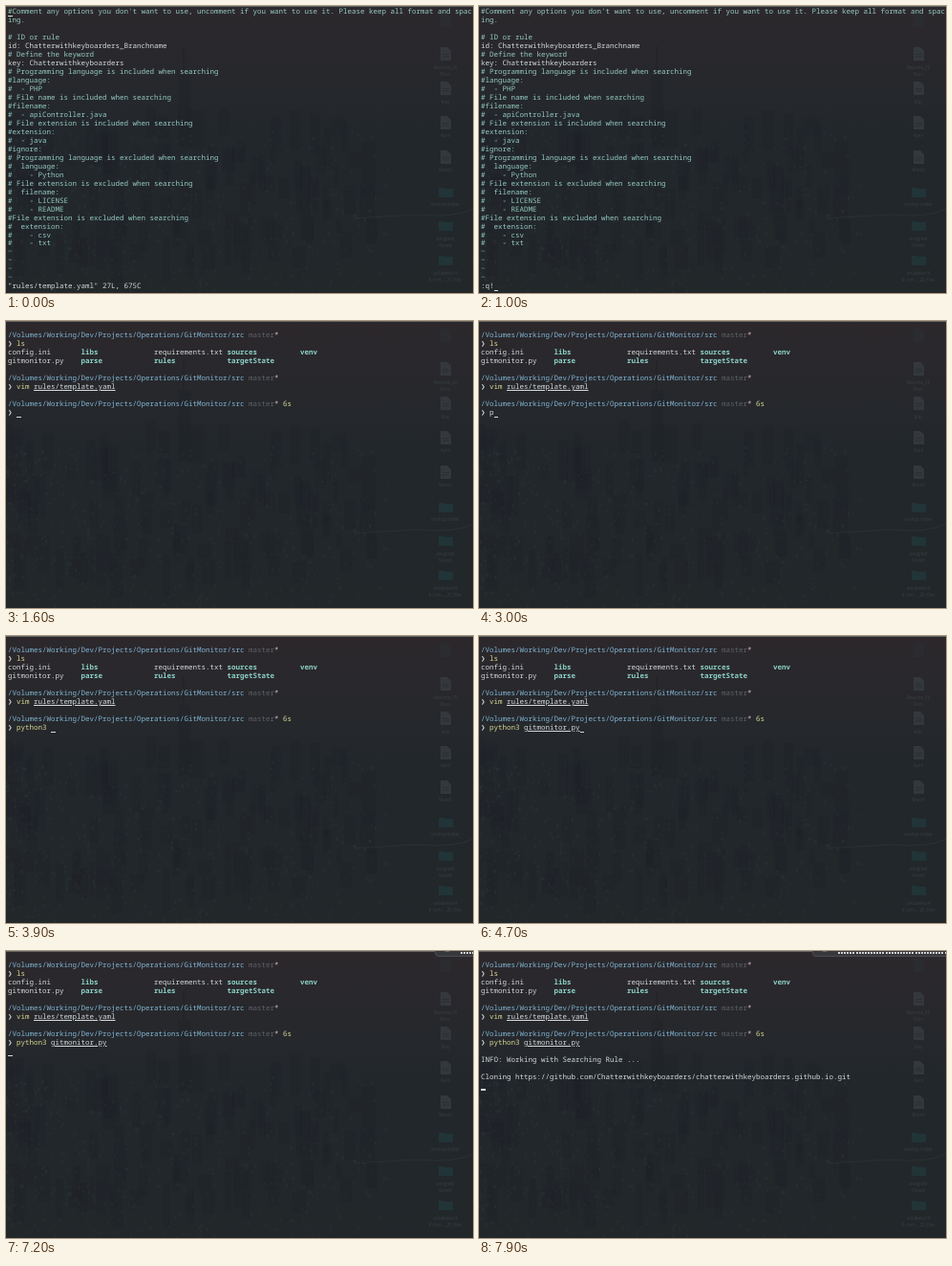
An HTML page with a canvas for the animation above (8 s loop, 489 by 300 pixels).

```html
<!DOCTYPE html>
<html lang="en">
<head>
<meta charset="utf-8">
<title>Terminal session</title>
<style>
  html, body { margin: 0; width: 100%; height: 100%; overflow: hidden; background: #22272b; }
  #stage { position: relative; width: 489px; height: 300px; overflow: hidden; }
  canvas, #text { position: absolute; left: 0; top: 0; }
  #text { font: 500 7.5px/8.97px "Noto Sans Mono", "DejaVu Sans Mono", monospace;
    color: #d3d8d8; text-rendering: geometricPrecision; font-variant-ligatures: none; }
  .row { position: absolute; left: 2px; height: 8.97px; white-space: pre; }
  .path { color: #80b4d3; }
  .branch { color: #5d6166; }
  .star { color: #e6c3d2; }
  .yellow { color: #d9d792; }
  .dir { color: #8bd0c7; font-weight: 600; }
  .note { color: #94c9c0; }
  .tilde { color: #7da7b4; }
  .file { text-decoration: underline; text-decoration-thickness: .8px; text-underline-offset: 1px; }
  .sign { display: inline-block; width: 4.5px; }
  #cursor { position: absolute; width: 4.5px; height: 1.2px; background: #d8dcdc; }
  .label { position: absolute; left: 430px; width: 60px; text-align: center; white-space: pre;
    font: 4.6px/7px "Open Sans", sans-serif; color: #3a3f43; }
  #toast { position: absolute; top: -30px; width: 170px; height: 36px; box-sizing: border-box;
    background: #37383c; border: 1px solid #4b4c50; border-radius: 4px; overflow: hidden; }
  #toast i { position: absolute; left: 8px; top: 22px; width: 8px; height: 8px; border-radius: 50%; background: #696b6f; }
  #toast b { position: absolute; left: 26px; top: 30px; width: 140px; height: 2px;
    background: repeating-linear-gradient(90deg, #d0d1d3 0 2px, transparent 2px 3.1px); }
</style>
</head>
<body>
<div id="stage">
  <canvas id="back" width="489" height="300"></canvas>
  <div id="labels"></div>
  <div id="text"></div>
  <div id="cursor"></div>
  <div id="toast"><i></i><b></b></div>
</div>
<script>
const LOOP = 8000, STEP = 100, ROW = 8.97, COL = 4.5;
const el = id => document.getElementById(id);
const span = (cls, s) => `<span class="${cls}">${s}</span>`;

const vimLines = `#Comment any options you don't want to use, uncomment if you want to use it. Please keep all format and spac
ing.

# ID or rule
id: Chatterwithkeyboarders_Branchname
# Define the keyword
key: Chatterwithkeyboarders
# Programming language is included when searching
#language:
#  - PHP
# File name is included when searching
#filename:
#  - apiController.java
# File extension is included when searching
#extension:
#  - java
#ignore:
# Programming language is excluded when searching
#  language:
#    - Python
# File extension is excluded when searching
#  filename:
#    - LICENSE
#    - README
#File extension is excluded when searching
#  extension:
#    - csv
#    - txt
~
~
~
~`.split("\n").map((s, i) =>
  s[0] === "#" || i === 1 ? span("note", s) : s === "~" ? span("tilde", s) : s);

const prompt = span("path", "/Volumes/Working/Dev/Projects/Operations/GitMonitor/src") +
  " " + span("branch", "master") + span("star", "*");
const sign = span("sign", "❯") + " ";
const list = (file, dirs, mid) =>
  file.padEnd(17) + span("dir", dirs[0].padEnd(17)) + mid +
  span("dir", dirs[1].padEnd(17) + (dirs[2] || ""));

const shellLines = [
  "", prompt, sign + span("yellow", "ls"),
  list("config.ini", ["libs", "sources", "venv"], "requirements.txt "),
  list("gitmonitor.py", ["parse", "targetState"], span("dir", "rules".padEnd(17))),
  "", prompt, sign + span("yellow", "vim") + " " + span("file", "rules/template.yaml")
];

// [time, typed so far]
const vimKeys = [[0, ""], [100, ":"], [200, ":q"], [800, ":q!"]];
const shellKeys = [
  [1300, ""], [3000, "p"], [3200, "py"], [3300, "pyt"], [3400, "pyth"], [3500, "pytho"],
  [3600, "python"], [3700, "python3"], [3900, "python3 "], [4200, "python3 g"],
  [4300, "python3 gi"], [4400, "python3 git"], [4500, "python3 gitm"],
  [4700, "python3 gitmonitor.py"]
];
const ENTER = 5200, INFO = 7800, CLONE = 7900;
const typed = (keys, t) => keys.filter(k => k[0] <= t).pop()[1];

function command(s) {
  const [name, arg] = s.split(" ");
  const head = name.startsWith("python") ? span("yellow", name) : name;
  return head + (arg === undefined ? "" : " " + (arg ? span("file", arg) : ""));
}

// Lines on screen and the cursor cell at time t
function screen(t) {
  if (t < 1200) {
    const s = typed(vimKeys, t);
    return s ? [[...vimLines, s], 32, s.length]
             : [[...vimLines, '"rules/template.yaml" 27L, 675C'], 0, 0];
  }
  if (t < 1300) return [shellLines, 8, 0];
  const s = typed(shellKeys, t);
  const lines = [...shellLines, "", prompt + " " + span("yellow", "6s"), sign + command(s)];
  if (t < ENTER) return [lines, 10, 2 + s.length];
  if (t < INFO) return [lines, 11, 0];
  lines.push("", "INFO: Working with Searching Rule ...");
  if (t < CLONE) return [lines, 13, 0];
  lines.push("", "Cloning https://github.com/Chatterwithkeyboarders/chatterwithkeyboarders.github.io.git");
  return [lines, 15, 0];
}

function drawBack() {
  const c = el("back").getContext("2d");
  let seed = 11;
  const rnd = () => (seed = seed * 16807 % 2147483647) / 2147483647;
  const box = (color, x, y, w, h) => { c.fillStyle = color; c.fillRect(x, y, w, h); };
  const sky = c.createLinearGradient(0, 0, 0, 300);
  [[0, "#2c282c"], [.15, "#29282c"], [.32, "#25282c"], [.45, "#22272b"], [1, "#22272a"]]
    .forEach(s => sky.addColorStop(...s));
  box(sky, 0, 0, 489, 300);
  // city blocks, lower and denser to the left
  for (let i = 0; i < 120; i++) {
    const x = 380 * rnd() ** 1.4, y = 105 + 150 * rnd();
    box("rgba(22,27,31,.1)", x, y, 5 + rnd() * 10, 15 + rnd() * 30);
  }
  for (let i = 0; i < 700; i++) {
    const x = 400 * rnd() ** 1.5, y = 130 + 170 * rnd();
    box("rgba(90,98,100,.09)", x, y, 1 + rnd() * 2, 1 + rnd() * 3);
  }
  // tall tower
  box("rgba(24,28,32,.2)", 180, 72, 13, 75);
  box("rgba(24,28,32,.2)", 185, 42, 2, 30);
  // shore on the right
  c.strokeStyle = "rgba(85,93,97,.18)";
  c.beginPath();
  c.moveTo(365, 222);
  c.lineTo(430, 218);
  c.quadraticCurveTo(470, 222, 489, 212);
  c.stroke();
  // desktop icons seen through the window
  [15, 50, 86, 122, 158].forEach((y, i) => {
    c.fillStyle = i ? "#34383c" : "#2b2c30";
    c.beginPath();
    [[455, y - 7], [462, y - 7], [466, y - 3], [466, y + 7], [455, y + 7]]
      .forEach(p => c.lineTo(...p));
    c.fill();
    box("#292d31", 457, y, 7, .8);
    box("#292d31", 457, y + 2.5, 7, .8);
  });
  [195, 230, 266].forEach(y => {
    box("#213337", 453, y - 5, 6, 2);
    box("#213438", 453, y - 4, 15, 9);
  });
  box("#606363", 0, 0, 489, 1);
}

const labels = [[61, "Resume_20\nDocs"], [97, "May"], [132, "April"], [168, "March"],
  [204, "onshop folder"], [240, "assigned\nNoted"], [276, "unlabeled 4\n6 com..._20_files"]];

let shown = "";
function draw(now) {
  const t = Math.floor(now % LOOP / STEP) * STEP;
  const [lines, row, col] = screen(t);
  const html = lines.map((s, i) =>
    s && `<div class="row" style="top:${(2.3 + i * ROW).toFixed(2)}px">${s}</div>`).join("");
  if (html !== shown) el("text").innerHTML = shown = html;
  el("cursor").style.left = 2 + col * COL + "px";
  el("cursor").style.top = 9.9 + row * ROW + "px";
  const p = Math.min(1, Math.max(0, (t - 7100) / 500));
  el("toast").style.left = 349 + 140 * (1 - p) ** 1.5 + "px";
}

drawBack();
el("labels").innerHTML = labels.map(([y, s]) =>
  `<div class="label" style="top:${y}px">${s}</div>`).join("");
const start = performance.now();
function tick() {
  draw(performance.now() - start);
  requestAnimationFrame(tick);
}
tick();
</script>
</body>
</html>
```
